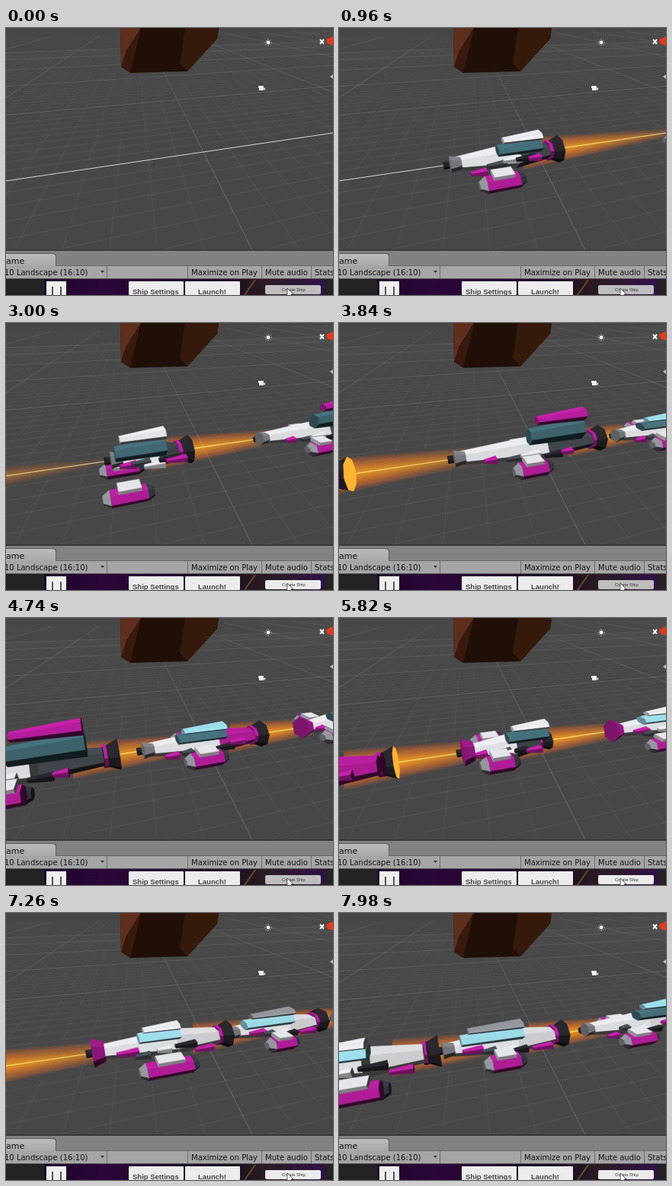
Recreate the animation shown at these times as an HTML page with a canvas. Size 429 by 351 pixels, loop 8 s.

```html
<!DOCTYPE html>
<html lang="en">
<head>
<meta charset="utf-8">
<title>Ship convoy</title>
<style>
html, body { margin: 0; width: 100%; height: 100%; overflow: hidden; background: #474747; }
canvas { display: block; }
</style>
</head>
<body>
<canvas id="stage" width="429" height="351"></canvas>
<script>
const W = 429, H = 351, LOOP = 8000, STEP = 60, CLICK_EVERY = 948;
const ctx = document.getElementById('stage').getContext('2d');

const COLOR = {
  white: [238, 239, 243], grey: [150, 153, 160], dark: [74, 80, 88], black: [40, 40, 46],
  magenta: [200, 32, 172], glass: [72, 116, 128], cyan: [160, 226, 240], fire: [255, 180, 50]
};

// [time, distance travelled by the convoy]
const TRAVEL = [[0, -620], [119, -620], [120, -490], [900, -182], [1740, 0], [3000, 235],
  [4740, 635], [5820, 893], [7260, 1151], [7980, 1309], [8040, 1322]];

// cabin: [centre as a share of the length, length, base, height]; pod: [centre, length, drop]
const SHIPS = [
  { nose: -240, len: 150, cabin: [0.62, 56, 6, 28], pod: [0.42, 56, 29], rear: 'dark' },
  { nose: 157, len: 105, cabin: [0.4, 60, 2, 38], pod: [0.2, 58, 44], rear: 'dark' },
  { nose: 362, len: 211, cabin: [0.66, 76, 10, 46], pod: [0.46, 50, 25], roof: 'magenta', rear: 'dark' },
  { nose: 595, len: 176, cabin: [0.47, 64, 6, 22], pod: [0.45, 55, 20], roof: 'cyan', rear: 'magenta' },
  { nose: 837, len: 121, cabin: [0.73, 52, 8, 26], pod: [0.37, 46, 17], rear: 'dark', collar: true, bell: 12 },
  { nose: 1053, len: 180, cabin: [0.47, 50, 8, 22], pod: [0.5, 72, 30], glass: 'cyan', collar: true },
  { nose: 1230, len: 165, cabin: [0.4, 76, 6, 25], pod: [0.45, 50, 23], roof: 'grey', glass: 'cyan' },
  { nose: 1423, len: 190, cabin: [0.66, 60, 8, 28], pod: [0.43, 62, 23], roof: 'cyan' }
];

// Vectors
const add = (a, b) => a.map((v, i) => v + b[i]);
const mul = (a, k) => a.map(v => v * k);
const dot = (a, b) => a[0] * b[0] + a[1] * b[1] + a[2] * b[2];
const unit = a => mul(a, 1 / Math.hypot(...a));
const cross = (a, b) => [a[1] * b[2] - a[2] * b[1], a[2] * b[0] - a[0] * b[2], a[0] * b[1] - a[1] * b[0]];
const mean = list => mul(list.reduce(add), 1 / list.length);

// Camera and flight line
const FOCAL = 310, MID = 214, EYE_Y = 146, HORIZON = -20, PERSP = 0.001;
const lineY = x => 201 - 0.1469 * x;
const drop = EYE_Y - lineY(MID);
const track = s => [s, drop + s * (0.1469 + drop * PERSP), FOCAL * (1 + PERSP * s)];
const project = p => [MID + FOCAL * p[0] / p[2], EYE_Y - FOCAL * p[1] / p[2]];
const BACK = unit(add(track(1), mul(track(0), -1)));
const UP = unit([0, FOCAL, HORIZON - EYE_Y]);
const SIDE = unit(cross(UP, BACK)).map((v, i, a) => a[2] > 0 ? -v : v);
const LIGHT = unit(add(add(mul(UP, 0.75), mul(SIDE, 0.3)), mul(BACK, -0.4)));
const spot = (s, h, w) => add(track(s), add(mul(UP, h), mul(SIDE, w)));

function noise(n) {
  const x = Math.sin(n * 127.1) * 43758.5453;
  return x - Math.floor(x);
}

function travelAt(t) {
  const i = TRAVEL.findIndex(k => k[0] > t);
  const [t0, p0] = TRAVEL[i - 1], [t1, p1] = TRAVEL[i];
  return p0 + (p1 - p0) * (t - t0) / (t1 - t0);
}

function poly(points, fill) {
  ctx.beginPath();
  for (const [x, y] of points) ctx.lineTo(x, y);
  ctx.closePath();
  ctx.fillStyle = fill;
  ctx.fill();
}

function stroke([x0, y0], [x1, y1], style, width = 1) {
  ctx.strokeStyle = style;
  ctx.lineWidth = width;
  ctx.beginPath();
  ctx.moveTo(x0, y0);
  ctx.lineTo(x1, y1);
  ctx.stroke();
}

function rect(x, y, w, h, fill, radius = 0) {
  ctx.fillStyle = fill;
  ctx.beginPath();
  ctx.roundRect(x, y, w, h, radius);
  ctx.fill();
}

function label(text, x, y, font, color = '#111') {
  ctx.font = font;
  ctx.fillStyle = color;
  ctx.fillText(text, x, y);
}

function ramp(from, to, stops, vertical = false) {
  const g = vertical ? ctx.createLinearGradient(0, from, 0, to) : ctx.createLinearGradient(from, 0, to, 0);
  stops.forEach((c, i) => g.addColorStop(i / (stops.length - 1), c));
  return g;
}

// A tapered prism lying along the flight line
function prism({ color, from, to, h = 0, w = 0, tall, wide = tall, front = 1, rear = 1,
  sides = 6, sit = 0, cap = color }) {
  const ring = (s, k) => Array.from({ length: sides }, (_, i) => {
    const a = (i + 0.5) / sides * 2 * Math.PI, r = k / Math.cos(Math.PI / sides);
    return spot(s, h - sit * tall * (1 - k) + tall * r * Math.cos(a), w + wide * r * Math.sin(a));
  });
  const a = ring(from, front), b = ring(to, rear), centre = mean([...a, ...b]);
  const faces = a.map((p, i) => [p, a[(i + 1) % sides], b[(i + 1) % sides], b[i]]);
  for (const face of [...faces, a, b]) drawFace(face, centre, face === b ? cap : color);
}

function drawFace(face, centre, color) {
  const middle = mean(face);
  let normal = unit(cross(add(face[2], mul(face[0], -1)), add(face[1], mul(face.at(-1), -1))));
  if (dot(normal, add(middle, mul(centre, -1))) < 0) normal = mul(normal, -1);
  if (dot(normal, middle) > 0) return;
  const k = color === 'fire' ? 1 : Math.min(1, 0.24 + 0.88 * Math.max(0, dot(normal, LIGHT)));
  const fill = `rgb(${COLOR[color].map(v => Math.round(v * k))})`;
  poly(face.map(project), fill);
  ctx.strokeStyle = fill;
  ctx.lineWidth = 0.5;
  ctx.stroke();
}

function drawPod(ship, s, dir) {
  const [at, len, fall] = ship.pod, w = 28 * dir;
  const h = (28 * -SIDE[1] - fall) / UP[1];
  const from = s + ship.len * at - len / 2, to = from + len;
  const box = { h, w, tall: 9, wide: 10 };
  prism({ ...box, color: 'dark', from: to - 8, to, rear: 0.6 });
  prism({ ...box, color: 'magenta', from: from + 8, to: to - 8 });
  prism({ ...box, color: 'grey', from, to: from + 8, front: 0.5 });
  prism({ color: 'white', from: from + len * 0.3, to: to - len * 0.25, h: h + 10, w: w * 0.85, tall: 2.5, wide: 8, sides: 4 });
}

function drawShip(ship, travel) {
  const s = ship.nose - travel, tail = s + ship.len;
  if (tail < -380 || s > 330) return;
  const { roof = 'white', glass = 'glass', rear = 'white', bell = 18 } = ship;
  const waist = s + ship.len * 0.58;
  drawPod(ship, s, -1);
  prism({ color: 'black', from: tail - 14, to: tail, tall: bell, front: 0.65, sides: 8, cap: 'fire' });
  prism({ color: 'magenta', from: tail - 18, to: tail - 13, tall: bell * 0.72, sides: 8 });
  prism({ color: rear, from: waist, to: tail - 17, tall: 14, wide: 17, rear: 0.65 });
  prism({ color: 'white', from: s + 14, to: waist, tall: 14, wide: 17, front: 0.5 });
  prism({ color: 'black', from: s, to: s + 10, tall: 4 });
  prism({ color: ship.collar ? 'magenta' : 'grey', from: s + 7, to: s + 20, tall: ship.collar ? 15 : 9, rear: 0.7 });

  const [at, len, base, height] = ship.cabin;
  const from = s + ship.len * at - len / 2, to = from + len;
  const low = base + height * 0.3, high = base + height * 0.8;
  prism({ color: glass, from, to, h: low, tall: height * 0.35, wide: 14, front: 0.6, rear: 0.8, sit: 1 });
  prism({ color: roof, from: from + len * 0.12, to, h: high, tall: height * 0.25, wide: 13, front: 0.4, rear: 0.7, sit: 1 });

  const trim = ['magenta', 'dark', 'white', 'black', 'magenta'];
  trim.forEach((color, i) => {
    const start = s + ship.len * (0.14 + 0.13 * i + 0.05 * noise(ship.nose + i));
    const size = 12 + 16 * noise(ship.nose + i + 9);
    prism({ color, from: start, to: start + size, h: 6 - 13 * noise(i + ship.len), w: 17, tall: 3.5, wide: 4, front: 0.5, sides: 4 });
  });
  drawPod(ship, s, 1);
}

function drawJet(ship, travel) {
  const tip = ship.nose + ship.len - travel, start = tip - 50, end = tip + 280;
  if (end < -300 || tip > 300) return;
  const at = (s, off) => {
    const [x, y] = project(track(s));
    return [x, y + off / (1 + PERSP * s)];
  };
  const x0 = at(start, 0)[0], x1 = at(end, 0)[0];
  const fade = (rgb, a) => ramp(x0, x1, [1, 0.85, 0.55, 0.28, 0].map(k => `rgba(${rgb},${a * k})`));
  const layers = 14;
  for (let i = layers; i > 0; i--) {
    const r = i / layers, wide = 22 * r, thin = 3 * r;
    const cone = [at(start, -wide), at(end, -thin), at(end, thin), at(start, wide)];
    poly(cone, fade(`255,${Math.round(205 - 105 * r)},30`, 0.13));
  }
  stroke(at(tip, 0), at(end, 0), fade('240,245,140', 0.9));
}

// Floor point on a grid along and across the flight line
function ground(u, v) {
  const a = u * 0.274, b = v * 0.6, q = 1 + a + b;
  return [(259 + 1504 * a + 168 * b) / q, (163 + HORIZON * (a + b)) / q];
}

function drawGrid() {
  const haze = top => ramp(0, 180, [`rgba(255,255,255,${top * 0.3})`, `rgba(255,255,255,${top})`], true);
  const minor = haze(0.045), major = haze(0.19);
  for (let i = -30; i <= 50; i++) {
    const style = i % 10 ? minor : major, n = i / 10;
    const u = 1 + n * 0.274, v = 1 + n * 0.6;
    stroke(ground(n, (0.12 - u) / 0.6), ground(n, 9), style);
    if (i && v > 0.15) stroke(ground((0.12 - v) / 0.274, n), ground(30, n), style);
  }
  stroke([0, lineY(0)], [W, lineY(W)], '#d6d6d6');
}

function drawAsteroid() {
  poly([[150, 0], [279, 0], [277, 14], [238, 57], [163, 59], [151, 51]], '#1f0f07');
  poly([[150, 0], [177, 0], [158, 30], [151, 51]], '#5e2f1d');
  poly([[177, 0], [172, 22], [163, 58], [151, 51], [158, 30]], '#38190e');
  poly([[235, 0], [279, 0], [277, 14], [238, 57], [228, 46]], '#351a0c');
}

function drawGizmos() {
  const white = '#f4f4f4';
  rect(341.6, 16.6, 4.8, 4.8, white, 2.4);
  for (let i = 0; i < 8; i++) {
    const ray = r => [344 + r * Math.cos(i * Math.PI / 4), 19 + r * Math.sin(i * Math.PI / 4)];
    stroke(ray(3.4), ray(4.6), '#ddd');
  }
  rect(331, 76, 7, 3, white, 1);
  rect(332, 78, 6, 4, white);
  poly([[338, 80], [340, 78], [340, 82]], white);
  stroke([412, 15], [417, 21], white, 2);
  stroke([417, 15], [412, 21], white, 2);
  poly([[420, 15], [429, 11], [429, 23], [422, 21]], '#e8391a');
  poly([[425, 64], [429, 61], [429, 67]], '#bbb');
}

function drawPanel() {
  const small = '10px "DejaVu Sans", sans-serif';
  rect(0, 291, W, 2, '#3a3a3a');
  rect(0, 293, W, 20, '#828282');
  rect(-10, 296, 76, 20, '#5c5c5c', 4);
  rect(-10, 297, 75, 20, ramp(297, 313, ['#bcbcbc', '#a8a8a8'], true), 4);
  rect(0, 313, W, 17, '#a5a5a5');
  rect(65, 312, W - 65, 1, '#666');
  rect(0, 329, W, 1, '#5a5a5a');
  for (const x of [132, 238, 335, 400]) rect(x, 313, 1, 16, '#6c6c6c');
  label('ame', 0, 310, '11px "DejaVu Sans", sans-serif');
  label('10 Landscape (16:10)', -2, 325, small);
  label('Maximize on Play', 243, 325, small);
  label('Mute audio', 340, 325, small);
  label('Stats', 405, 325, small);
  poly([[124, 319], [129, 319], [126.5, 322]], '#333');
}

function drawGameView(t) {
  const bold = 'bold 9.5px "Liberation Sans", Arial, sans-serif';
  const pressed = t % CLICK_EVERY < 2 * STEP;
  rect(0, 330, W, 21, '#222');
  rect(50, 330, 368, 21, ramp(50, 418, ['#1d0428', '#2b0639', '#220730', '#180822', '#2a1c22', '#30104a']));
  stroke([313, 351], [327, 331], 'rgba(190,140,40,0.45)', 2);
  rect(53, 333, 26, 18, '#efefef');
  for (const x of [60, 71]) rect(x, 340, 2, 11, '#555');
  for (const x of [161, 235]) rect(x, 333, 72, 18, '#ececec', 1);
  label('Ship Settings', 166, 349.5, bold, '#444');
  label('Launch!', 252, 349.5, bold, '#444');
  rect(340, 338, 73, 12, pressed ? '#bebebe' : '#ebebeb', 2);
  label('Create Ship', 362, 345.5, '5.8px "Liberation Sans", Arial, sans-serif', '#333');
  poly([[369, 342], [369, 353], [372, 351], [374, 354], [374, 350], [377, 350]], '#fff');
  ctx.strokeStyle = '#222';
  ctx.lineWidth = 0.7;
  ctx.stroke();
}

function draw(now) {
  const t = Math.floor(now % LOOP / STEP) * STEP;
  const travel = travelAt(t);
  rect(0, 0, W, H, '#474747');
  drawGrid();
  drawAsteroid();
  for (const ship of SHIPS) drawJet(ship, travel);
  for (const ship of [...SHIPS].reverse()) drawShip(ship, travel);
  drawGizmos();
  drawPanel();
  drawGameView(t);
}

const begin = performance.now();
function tick() {
  draw(performance.now() - begin);
  requestAnimationFrame(tick);
}
tick();
</script>
</body>
</html>
```
